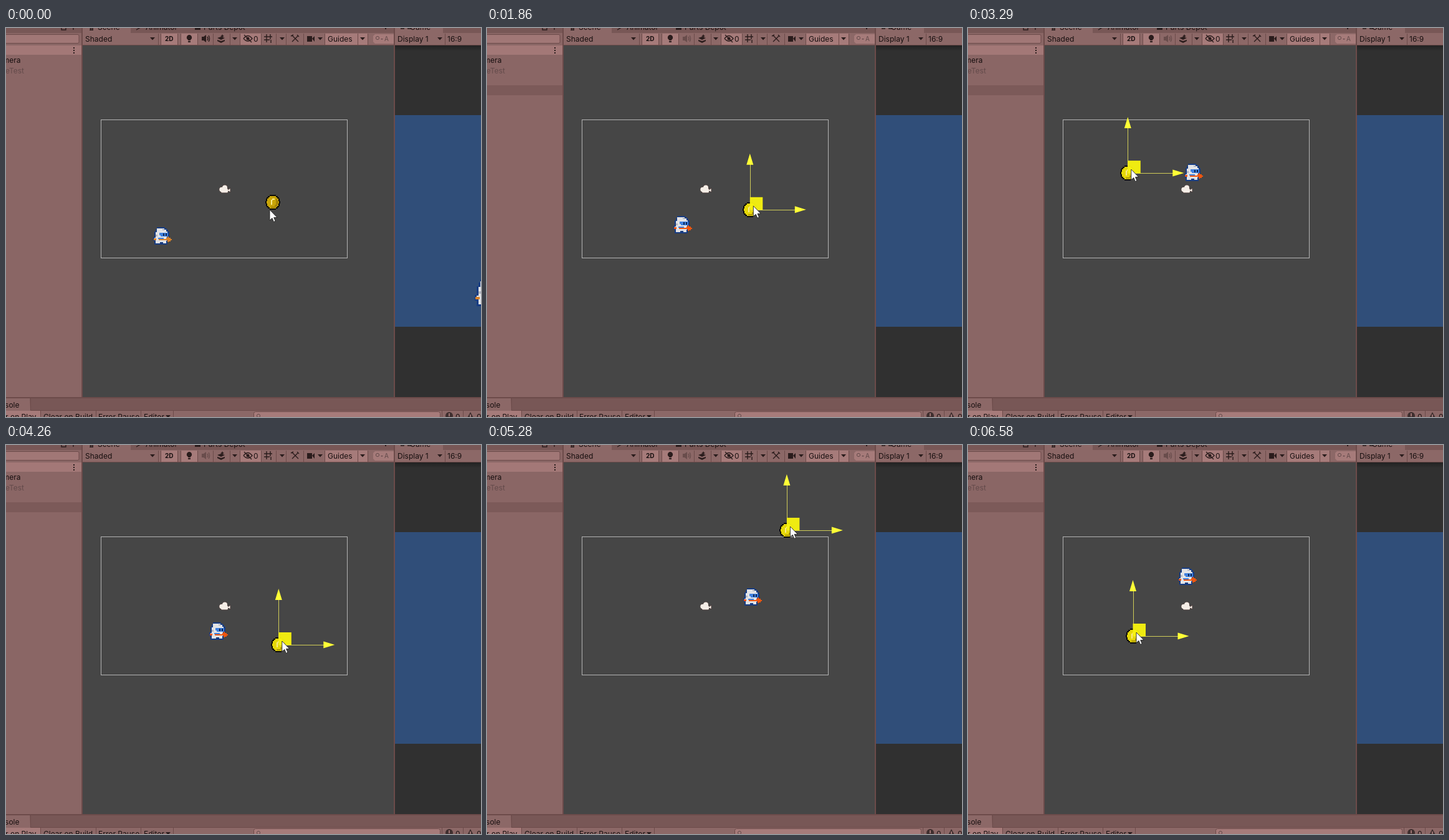
Animation of 762x625 px, one loop 6630 ms. Source, as an HTML page:

```html
<!DOCTYPE html>
<html lang="en">
<head>
<meta charset="utf-8">
<title>Coin follow test</title>
<style>
  html, body { margin: 0; width: 100%; height: 100%; overflow: hidden; background: #464646; }
  svg { display: block; width: 100%; height: 100%; }
  text { font: 12px Inter, "Open Sans", sans-serif; fill: #170f0f; }
  .end { text-anchor: end; }
  .lit { fill: #a67b7a; }
  .bar { fill: #8c6867; }
  .edge { fill: #6c4b4a; }
  .ink { fill: #2a1c1c; }
  .line { fill: none; stroke: #2a1c1c; stroke-width: 1.4; }
  .rule { stroke: #6c4b4a; }
  .lens { fill: none; stroke: #644b4b; }
  .dim { fill: #644b4b; }
  .small { font-size: 10px; }
  .bold { font-weight: 700; }
  .pix { shape-rendering: crispEdges; }
</style>
</head>
<body>
<svg viewBox="0 0 762 625" xmlns="http://www.w3.org/2000/svg">
  <defs>
    <clipPath id="sceneClip"><rect x="123" y="28" width="499" height="565"/></clipPath>
    <clipPath id="gameClip"><rect x="624" y="140" width="138" height="340"/></clipPath>
    <linearGradient id="shade" x2="0" y2="1">
      <stop stop-opacity=".3"/><stop offset="1" stop-opacity="0"/>
    </linearGradient>
    <g id="knight" class="pix">
      <path fill="#173c82" d="M-8-15H5v2H8v2h2v3h2V1h-2V8H9v5H-12V7h-2V1h2v-9h2v-4h2z"/>
      <path fill="#e2e3e6" d="M-8-13H4v2H7v3H9V0H8v7H7v4H2V9h-5v2h-7V6h-2V2h2v-9h2z"/>
      <path fill="#b4b7c0" d="M-10-3h3v3h-3zM1-12h3v2H1z"/>
      <path fill="#3f80df" d="M-4-6H10V0H-2v-2h-2zM-6 2H3v2H-6z"/>
      <path fill="#10264f" d="M2-5h2v4H2zM6-5h2v4H6z"/>
      <path class="spear" d="M-13 3h4v3h-4zM-5 4H7V2h2V0h2v2h3v2h2v2h-2v2h-3v1H9V6H-5z"/>
    </g>
    <g id="coin" class="pix">
      <path id="rim" fill="#0c0b06"/>
      <path id="gold"/>
      <path fill="#8f7106" d="M5-6h2v3h2V4H7v3H4v2H-3V7H3V4h2z" opacity=".6"/>
      <path fill="#f8ea8a" d="M-3-4h2v-2H3v2H0v1h-1v7h-2z"/>
    </g>
    <g id="film">
      <circle cx="351" cy="256.500" r="4"/><circle cx="346" cy="259.500" r="3.700"/>
      <rect x="345" y="258" width="11" height="6.500" rx="1.500"/>
      <path d="M355 261l4.500-3v5z"/>
    </g>
  </defs>

  <rect width="762" height="625" fill="#785756"/>

  <g id="hierarchy">
    <rect y="8" width="121" height="585" fill="#8a6665"/>
    <rect x="-6" y="10.500" width="123" height="14" rx="2" fill="#a17776" class="rule"/>
    <rect y="28" width="121" height="15" fill="#a37877"/>
    <path class="ink" d="M108 31h2v2h-2zM108 35h2v2h-2zM108 39h2v2h-2z"/>
    <rect id="row" y="92" width="121" height="16" fill="#7c5a59"/>
    <text x="23.500" y="56" class="end">Camera</text>
    <text x="29" y="73" class="end dim">eTest</text>
    <path class="line" d="M89-3h7v6h-7zM108 0v3"/>
  </g>

  <g id="tabs">
    <path class="bar" d="M123 0h77v8h-77zM624 0h77v8h-77zM123 8h639v19H123z"/>
    <path class="line" d="M134 0h6M134 3h6M136-2v6M139-2v6M209-3l5 3-5 3M633 1h6M644 1h6"/>
    <path class="ink" d="M303-5h9v8h-9zM608 0h2v2h-2z"/>
    <text x="147" y="3">Scene</text>
    <text x="224" y="3">Animator</text>
    <text x="317" y="3">Parts Depot</text>
    <text x="648" y="3">Game</text>
  </g>

  <g id="toolbar">
    <path class="lit" d="M249 9h26v18h-26zM281 9h26v18h-26zM376 9h33v18h-33zM512 9h68v18h-68z"/>
    <path class="lit" d="M592 10h30v15h-30l-3-3v-9z"/>
    <text x="127" y="22">Shaded</text>
    <text x="255" y="21" class="small bold">2D</text>
    <text x="397" y="22">0</text>
    <text x="516" y="22">Guides</text>
    <text x="607" y="21" class="small dim">A</text>
    <text x="628" y="22">Display 1</text>
    <text x="708" y="22">16:9</text>
    <path class="ink" d="M294 11a4.300 4.300 0 0 1 2 8v1h-4v-1a4.300 4.300 0 0 1 2-8zM292 21h4v2h-4z"/>
    <g id="sound">
      <path class="ink" d="M314 14h3l4-3v12l-4-3h-3z"/>
      <path class="line" d="M323 14q2 3 0 6M325 12q3 5 0 10"/>
    </g>
    <path class="ink" d="M339 16l6-2 6 2-6 3zM339 19l6 2 6-2v2l-6 3-6-3zM347 10l1 2 2 1-2 1-1 2-1-2-2-1 2-1z"/>
    <path class="line" d="M381 17q7-9 14 0q-7 8-14 0M382 11l12 12"/>
    <circle class="ink" cx="388" cy="17" r="2.500"/>
    <path class="line" d="M414 14h13M414 19h9M418 10v13M424 10v8M425 19v5"/>
    <path class="line" d="M459 12l10 10M469 12l-10 10M457 13l4-2M467 11l3 3"/>
    <path class="ink" d="M483 13h8v9h-8zM491 17l4-4v9z"/>
    <circle class="lens" cx="596" cy="16" r="2.600"/>
    <path class="dim" d="M601 17h4l-2 2z"/>
  </g>

  <path class="edge" d="M121 0h2v593h-2zM622 0h2v593h-2z"/>
  <rect x="123" y="28" width="499" height="565" fill="#464646"/>
  <rect x="624" y="28" width="138" height="565" fill="#303030"/>
  <rect x="624" y="28" width="138" height="9" fill="url(#shade)"/>
  <path class="rule" d="M123 27.500h639"/>
  <rect x="624" y="140" width="138" height="340" fill="#304e79"/>

  <g id="console">
    <rect class="edge" y="593" width="762" height="2"/>
    <path class="bar" d="M0 595h38l1 19H0zM0 614h762v11H0z"/>
    <path class="rule" d="M39 614.500h723M39.500 595v19"/>
    <rect class="lit" y="615" width="55" height="10"/>
    <rect class="lit rule" x="397.500" y="616.500" width="299" height="14" rx="3"/>
    <text x="21.500" y="610" class="end">sole</text>
    <text x="48.500" y="629" class="end">r on Play</text>
    <text x="60" y="629">Clear on Build</text>
    <text x="148" y="629">Error Pause</text>
    <text x="221" y="629">Editor</text>
    <circle class="lens" cx="405" cy="623" r="2.600"/>
    <circle cx="711" cy="623" r="6" fill="#3f2f2f"/>
    <path d="M745 617l6 11h-12z" fill="#3f2f2f"/>
    <path d="M711 619v5M745 621v4" stroke="#a67b7a" stroke-width="1.800"/>
    <text x="721" y="629">0</text>
    <text x="755" y="629">0</text>
  </g>

  <path id="rules" class="rule"/>
  <path id="arrows" class="ink"/>

  <g clip-path="url(#gameClip)">
    <g transform="translate(624 140) scale(1.5316) translate(-152.500 -147.500)">
      <use href="#coin" class="coinAt"/>
      <use href="#knight" class="knightAt"/>
    </g>
  </g>

  <g clip-path="url(#sceneClip)">
    <rect x="152.500" y="147.500" width="395" height="222" fill="none" stroke="#b4b4b4"/>
    <use href="#knight" class="knightAt"/>
    <use href="#film" stroke="#4e3b38" stroke-width="1.400"/>
    <use href="#film" fill="#f5eee7"/>
    <use href="#coin" class="coinAt"/>
    <g id="gizmo" class="coinAt">
      <path d="M.5 0V-73M0 .5H73" stroke="#d0cc58" fill="none" class="pix"/>
      <path d="M0-90l5.500 18h-11zM90 0l-18 5.500v-11z" fill="#ffff36"/>
      <rect y="-20" width="20.500" height="20.500" fill="#f8f40e" opacity=".95"/>
    </g>
    <path id="cursor" d="M0 0V17L4 13.500 6.500 19.500 9.200 18.300 6.700 12.500H12z" fill="#fff" stroke="#222" stroke-width=".9"/>
  </g>
</svg>

<script>
const LOOP = 6630, HOVER = 330, PRESS = 1020, SELECT = 1100, CHASE = 1290;
const SPEED = 0.114; // knight, px per ms
const STEP = 10;

// Turning points of the dragged coin: ms, x, y.
const turns = [
  [1450, 428, 280], [2000, 421, 290], [2550, 433, 232.5], [2780, 421, 207],
  [3290, 256.5, 233], [3560, 254, 305], [3900, 310, 338], [4260, 437, 321],
  [4440, 489, 348], [4640, 497, 212], [4870, 496, 162], [5280, 481, 137],
  [5560, 424, 108], [5850, 350, 118], [6250, 272, 261], [6580, 264.5, 307]
];

const byId = id => document.getElementById(id);
const all = name => document.querySelectorAll(name);
const clamp = u => Math.min(1, Math.max(0, u));
const ease = u => u * u * (3 - 2 * u);
const mix = (a, b, u) => a.map((v, i) => v + (b[i] - v) * u);

// Disc built from rows two pixels high.
function disc(rx, ry) {
  let d = '';
  for (let y = -ry; y < ry; y += 2) {
    const w = Math.round(rx * Math.sqrt(1 - ((y + 1) / ry) ** 2) + 0.8);
    d += `M${-w} ${y}h${2 * w}v2h${-2 * w}z`;
  }
  return d;
}

function slope(i, axis) {
  const a = turns[i - 1], b = turns[i + 1];
  return a && b ? (b[axis] - a[axis]) / (b[0] - a[0]) : 0;
}

function coinAt(t) {
  const i = turns.findIndex(k => k[0] > t) - 1;
  if (i === -2) return turns[turns.length - 1].slice(1);
  if (i === -1) return turns[0].slice(1);
  const a = turns[i], b = turns[i + 1], span = b[0] - a[0], u = (t - a[0]) / span;
  return [1, 2].map(axis => {
    const d = b[axis] - a[axis], m = slope(i, axis) * span, n = slope(i + 1, axis) * span;
    return a[axis] + u * (m + u * (3 * d - 2 * m - n + u * (m + n - 2 * d)));
  });
}

// The knight walks towards the coin at a steady pace.
const trail = [[250, 335]];
for (let t = CHASE; t < LOOP; t += STEP) {
  const here = trail[trail.length - 1], goal = coinAt(t);
  const gap = Math.hypot(goal[0] - here[0], goal[1] - here[1]);
  trail.push(mix(here, goal, clamp(SPEED * STEP / gap)));
}

function knightAt(t) {
  const at = Math.max(0, (t - CHASE) / STEP), i = Math.min(trail.length - 2, Math.floor(at));
  return mix(trail[i], trail[i + 1], at - i);
}

function cursorAt(t, [x, y]) {
  const hover = mix([423, 292], [429, 268], ease(clamp((t - HOVER) / (PRESS - HOVER))));
  return mix(hover, [x + 5.5, y - 6], ease(clamp((t - PRESS) / 180)));
}

function place(nodes, [x, y]) {
  const move = `translate(${x.toFixed(1)} ${y.toFixed(1)})`;
  for (const node of nodes) node.setAttribute('transform', move);
}

const rules = (xs, y, h) => xs.map(x => `M${x}.5 ${y}v${h}`).join('');
const arrow = (x, y) => `M${x} ${y}h8l-4 4.5z`;

byId('rim').setAttribute('d', disc(11, 12));
byId('gold').setAttribute('d', disc(9, 10));
byId('rules').setAttribute('d',
  rules([244, 248, 275, 280, 307, 332, 359, 375, 409, 433, 449, 477, 511, 564, 580, 704], 9, 18) +
  rules([55, 144, 216, 268, 699, 733], 615, 10));
byId('arrows').setAttribute('d',
  [231, 363, 439, 500, 568, 692].map(x => arrow(x, 15)).join('') + arrow(256, 622));

const coins = all('.coinAt'), knights = all('.knightAt');
const gizmo = byId('gizmo'), row = byId('row'), sound = byId('sound'), cursor = byId('cursor');
const gold = byId('gold'), spear = document.querySelector('.spear');

function draw(t) {
  const coin = coinAt(t), selected = t >= SELECT;
  place(coins, coin);
  place(knights, knightAt(t));
  place([cursor], cursorAt(t, coin));
  gizmo.style.display = row.style.display = selected ? '' : 'none';
  sound.style.opacity = selected ? 0.35 : 1;
  gold.style.fill = t >= PRESS ? '#e6d808' : '#c9a508';
  spear.style.fill = selected ? '#f0560f' : '#d9822a';
}

const start = performance.now();
function tick() {
  draw((performance.now() - start) % LOOP);
  requestAnimationFrame(tick);
}
tick();
</script>
</body>
</html>
```
